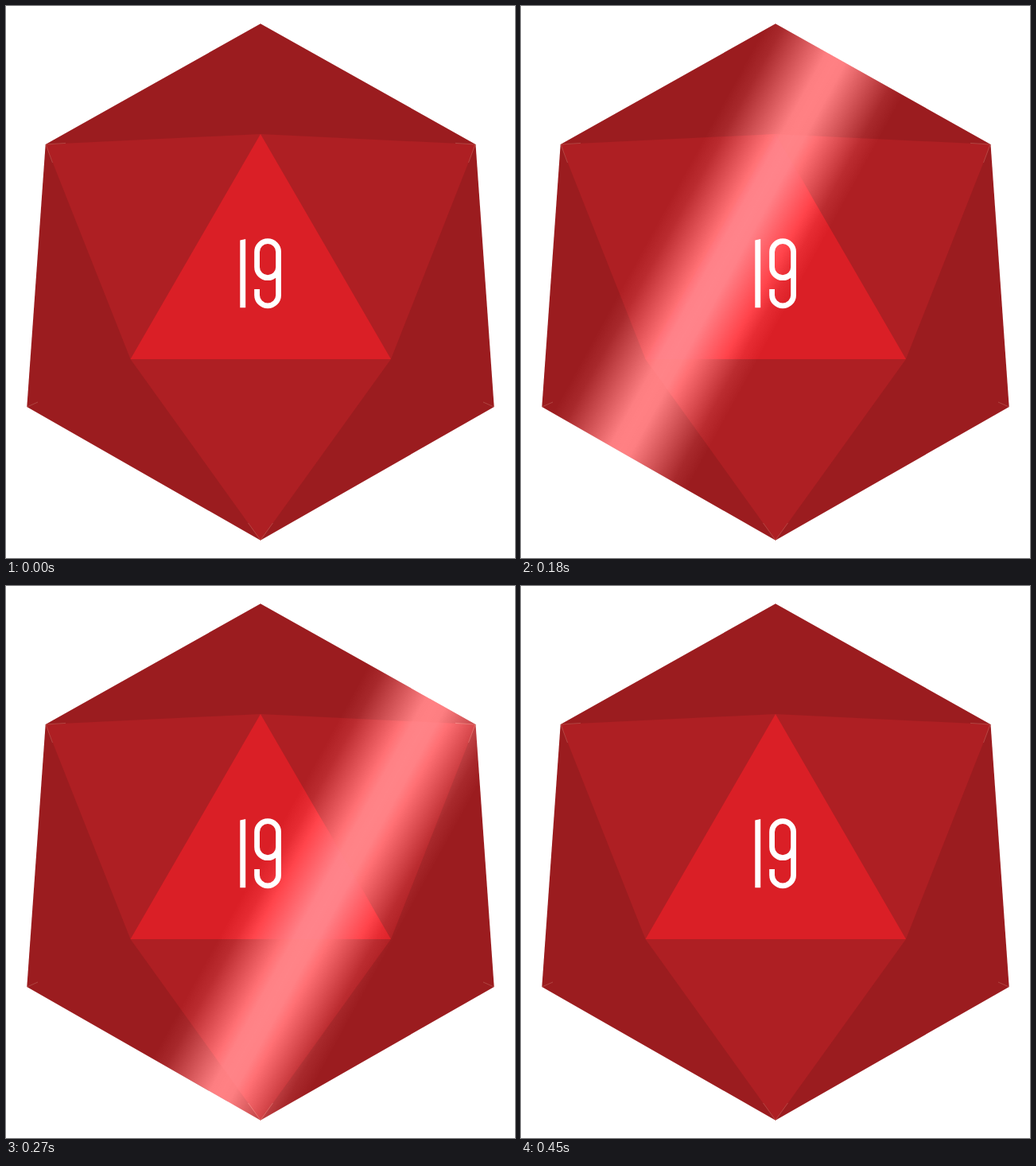
Write an HTML page that moves like this. It is 640 px wide and 694 px high and loops after 4500 ms.

```html
<!DOCTYPE html>
<html lang="en">
<head>
<meta charset="utf-8">
<title>Twenty-sided die</title>
<style>
  html, body { margin: 0; width: 100%; height: 100%; overflow: hidden; background: #fff; }
  svg { display: block; width: 640px; height: 694px; }
  .dark { fill: #9b1c1f; }
  .mid { fill: #ae1f23; }
  .front { fill: #da1f26; }
  .seams { fill: none; stroke: #d08a7c; stroke-width: .6; opacity: .6; }
  .digits { fill: none; stroke: #fff; stroke-width: 6.8; }
  .shine { mix-blend-mode: plus-lighter; }
  .band { animation: sweep 4500ms infinite; }

  /* The glint moves in 30 ms steps, then rests off the die. */
  @keyframes sweep {
    0% { transform: translateX(-200px); animation-timing-function: step-end; }
    .666% { transform: translateX(102px); animation-timing-function: steps(14, end); }
    9.999%, 100% { transform: translateX(876px); }
  }
</style>
</head>
<body>
<svg viewBox="0 0 640 694" role="img" aria-label="19">
  <defs>
    <linearGradient id="glint">
      <stop offset="0" stop-color="#fff" stop-opacity="0"/>
      <stop offset=".1" stop-color="#fff" stop-opacity=".05"/>
      <stop offset=".43" stop-color="#fff" stop-opacity=".385"/>
      <stop offset=".5" stop-color="#fff" stop-opacity=".395"/>
      <stop offset=".57" stop-color="#fff" stop-opacity=".385"/>
      <stop offset=".9" stop-color="#fff" stop-opacity=".05"/>
      <stop offset="1" stop-color="#fff" stop-opacity="0"/>
    </linearGradient>
    <path id="outline" d="M320 22.3 590.5 174 613.7 504 320 671.7 26.3 504 49.7 174Z"/>
    <clipPath id="die"><use href="#outline"/></clipPath>
  </defs>

  <rect width="640" height="694" fill="#fff"/>
  <use href="#outline" class="dark"/>
  <path class="mid" d="M49.7 174 320 161 590.5 174 484 444 320 671.7 156.5 444Z"/>
  <path class="front" d="M320 161 484 444H156.5Z"/>
  <path class="seams" d="M75 172.4 50 174 58.5 197M565 172.4 590 174 581.5 197
    M26.5 504 40 498M613.5 504 600 498M304.5 650 320 671.5 335.5 650"/>

  <g class="shine" clip-path="url(#die)">
    <g transform="rotate(28.8)">
      <rect class="band" x="-97" y="-400" width="194" height="1100" fill="url(#glint)"/>
    </g>
  </g>

  <path fill="#fff" d="M294.3 294.4 301.2 293V379.3H294.3Z"/>
  <path class="digits" d="M342.6 309.2a13.5 13.5 0 0 0-27 0v19a13.5 13.5 0 0 0 27 0Z
    M342.6 309.2v54.2a13.5 13.5 0 0 1-27 0v-7.4"/>
</svg>
</body>
</html>
```
